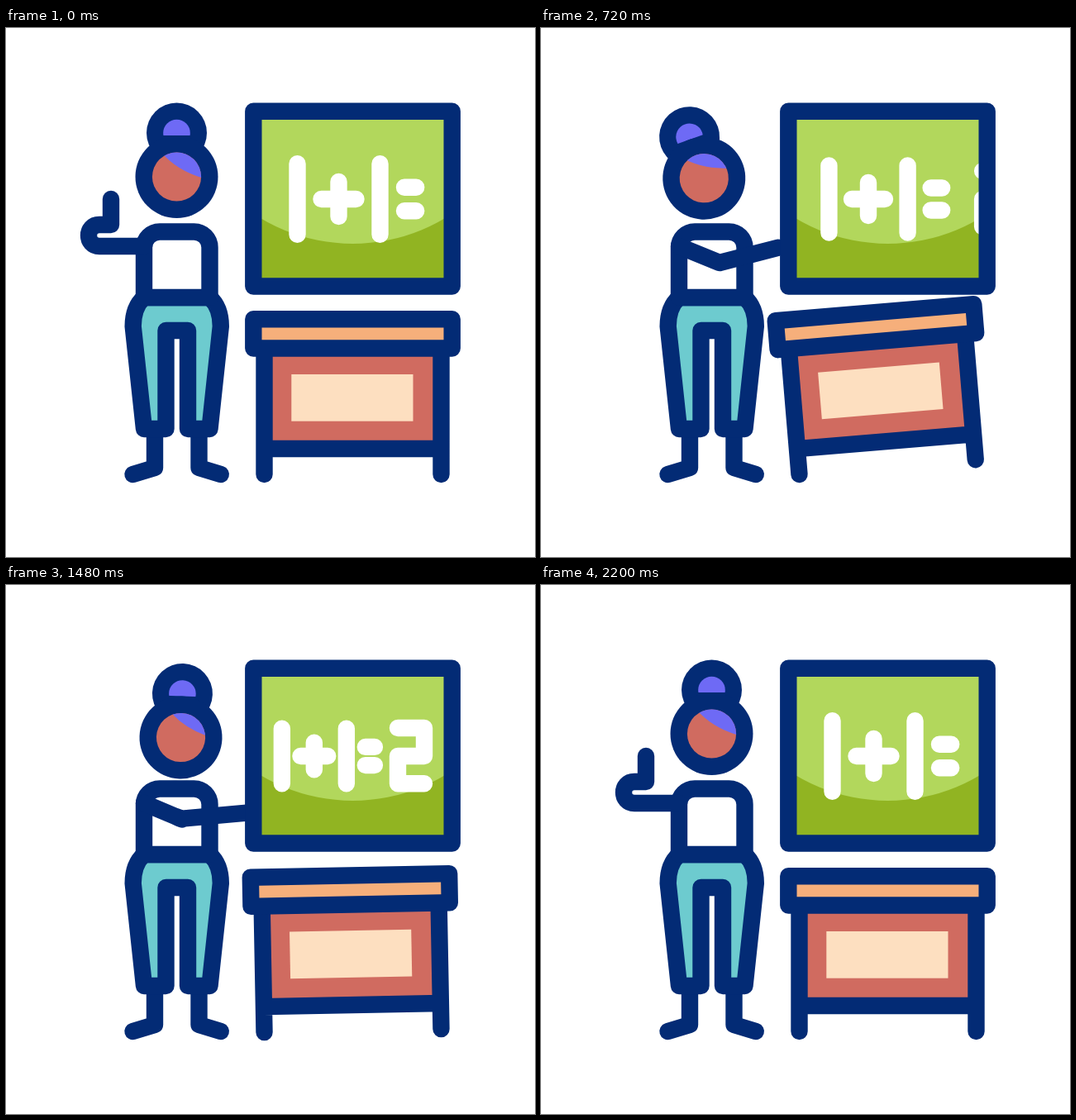
Write an HTML page with a canvas that moves like this. It is 640 px wide and 640 px high and loops after 2400 ms.

```html
<!DOCTYPE html>
<html lang="en">
<head>
<meta charset="utf-8">
<title>Teacher at the board</title>
<style>
html, body { margin: 0; width: 100%; height: 100%; overflow: hidden; background: #fff; }
canvas { display: block; width: 640px; height: 640px; }
</style>
</head>
<body>
<canvas id="stage" width="640" height="640"></canvas>
<script>
const ctx = document.getElementById('stage').getContext('2d');
const LOOP = 2400;
const STROKE = 20.4;
const NAVY = '#032b75', LIME = '#b2d75c', MOSS = '#91b422', VIOLET = '#6e6af5',
      BRICK = '#d06b60', TEAL = '#6dcbcf', ORANGE = '#f6af7b', CREAM = '#fddfc0';

const lerp = (a, b, k) => a + (b - a) * k;
const mix = (a, b, k) => [lerp(a[0], b[0], k), lerp(a[1], b[1], k)];
const ease = k => k * k * (3 - 2 * k);

// Eased value at time t from [time, value] keys.
function track(t, ...keys) {
  if (t <= keys[0][0]) return keys[0][1];
  for (let i = 1; i < keys.length; i++) {
    const [t0, v0] = keys[i - 1], [t1, v1] = keys[i];
    if (t < t1) return lerp(v0, v1, ease((t - t0) / (t1 - t0)));
  }
  return keys[keys.length - 1][1];
}

function outline(path, fill, color = NAVY) {
  if (fill) { ctx.fillStyle = fill; ctx.fill(path); }
  ctx.strokeStyle = color;
  ctx.stroke(path);
}

function box(x, y, w, h, fill) {
  const p = new Path2D();
  p.rect(x, y, w, h);
  outline(p, fill);
}

function disc(x, y, r, fill) {
  ctx.fillStyle = fill;
  ctx.beginPath();
  ctx.arc(x, y, r, 0, Math.PI * 2);
  ctx.fill();
}

function rotateAbout(x, y, degrees) {
  ctx.translate(x, y);
  ctx.rotate(degrees * Math.PI / 180);
  ctx.translate(-x, -y);
}

const torso = new Path2D('M167 326V265.5A19 19 0 0 1 186 246.5H227.5A19 19 0 0 1 246.5 265.5V326Z');
const trousers = new Path2D('M167 326C158 334 153.7 347 153.7 361L167 485H193.5V366H220V485H246.5L259.8 361C259.8 347 255.5 334 246.5 326Z');
const feet = new Path2D('M180 490V532L153.5 540M233.5 490V532L259.8 540');
const two = new Path2D('M474 173H506V207H474V240.3H506');
const deskLegs = new Path2D('M312.5 388V540M526.5 388V540M312.5 509H526.5');

function drawBody() {
  outline(feet);
  outline(trousers, TEAL);
  outline(torso, '#fff');
}

function drawArm(t) {
  const bend = track(t, [200, 0], [600, 1], [1400, 1], [2200, 0]);
  const reach = track(t, [600, 0], [1000, 1], [1400, 1], [1800, 0]);
  const elbow = [216, 284], inner = [206, 280];
  const hand = mix([127, 207], [282 + 20 * reach, 262 + 17.5 * reach], bend ** 1.15);
  const wrist = mix([127, 238], elbow, bend);
  const top = mix([113, 238], elbow, bend);
  const bottom = mix([113, 264], elbow, bend);
  ctx.beginPath();
  ctx.moveTo(...hand);
  ctx.lineTo(...wrist);
  ctx.lineTo(...top);
  ctx.bezierCurveTo(...mix([95.7, 238], inner, bend), ...mix([95.7, 264], inner, bend), ...bottom);
  ctx.lineTo(167, 264);
  ctx.strokeStyle = NAVY;
  ctx.stroke();
}

function drawHead(t) {
  const tilt = track(t, [200, 0], [500, -20], [670, -20], [1230, 2.3], [1400, 2.3], [1800, 0]);
  const nod = track(t, [670, 0], [1230, 1], [1400, 1], [1800, 0]);
  const part = track(t, [200, 0], [700, 3.2], [1230, 5], [1400, 5], [1800, 0]);
  ctx.save();
  ctx.translate(4.5 * nod, 5 * nod);
  rotateAbout(206.5, 208, tilt);

  disc(206.5, 127, 36.5, NAVY);
  ctx.save();
  ctx.beginPath();
  ctx.rect(186, 105, 41, 25);
  ctx.clip();
  disc(206.5, 127, 16.3, VIOLET);
  ctx.restore();

  disc(206.5, 180, 50, NAVY);
  disc(206.5, 180, 29.6, BRICK);
  ctx.beginPath();
  ctx.arc(206.5, 180, 29.6, 0, Math.PI * 2);
  ctx.clip();
  ctx.translate(0.5 * part, -0.86 * part);
  ctx.beginPath();
  ctx.moveTo(184, 146);
  ctx.quadraticCurveTo(206, 174, 244, 183);
  ctx.lineTo(260, 140);
  ctx.lineTo(200, 130);
  ctx.fillStyle = VIOLET;
  ctx.fill();
  ctx.restore();
}

function drawSum(t) {
  const shrink = track(t, [600, 0], [1000, 1], [1800, 1], [2200, 0]);
  const size = 1 - 0.22 * shrink;
  const px = x => 424.5 - 34.5 * shrink + (x - 424.5) * size;
  const py = y => 207 + (y - 207) * size;
  const line = (x0, y0, x1, y1) => {
    ctx.moveTo(px(x0), py(y0));
    ctx.lineTo(px(x1), py(y1));
  };
  ctx.strokeStyle = '#fff';
  ctx.beginPath();
  line(352.5, 164.3, 352.5, 249.7);
  line(381.5, 207, 423.5, 207);
  line(402.5, 186, 402.5, 228);
  line(452.5, 164.3, 452.5, 249.7);
  line(482, 192.8, 496.2, 192.8);
  line(482, 221.2, 496.2, 221.2);
  ctx.stroke();
  ctx.translate(77 * (1 - shrink), 0);
  outline(two, null, '#fff');
}

function drawBoard(t) {
  ctx.save();
  ctx.beginPath();
  ctx.rect(299, 100.5, 241, 212);
  ctx.clip();
  ctx.fillStyle = MOSS;
  ctx.fillRect(299, 100, 241, 213);
  disc(419.5, 44.3, 216.7, LIME);
  drawSum(t);
  ctx.restore();
  box(299.3, 100.7, 240.4, 211.8);
}

function drawDesk(t) {
  const tilt = track(t, [240, 0], [640, -5], [1190, -1.2], [1400, -1.2], [1800, 0]);
  const sink = track(t, [640, 0], [1190, 1.2], [1400, 1.2], [1800, 0]);
  ctx.save();
  ctx.translate(0, sink);
  rotateAbout(312.5, 540, tilt);
  ctx.fillStyle = BRICK;
  ctx.fillRect(312.5, 388, 214, 121);
  ctx.fillStyle = CREAM;
  ctx.fillRect(345.3, 419, 147.2, 56.7);
  outline(deskLegs);
  box(299.3, 352.3, 240.4, 35.2, ORANGE);
  ctx.restore();
}

function draw(now) {
  const t = now % LOOP;
  ctx.fillStyle = '#fff';
  ctx.fillRect(0, 0, 640, 640);
  ctx.lineWidth = STROKE;
  ctx.lineCap = ctx.lineJoin = 'round';
  drawBody();
  drawArm(t);
  drawHead(t);
  drawBoard(t);
  drawDesk(t);
}

const start = performance.now();
function tick() {
  draw(performance.now() - start);
  requestAnimationFrame(tick);
}
tick();
</script>
</body>
</html>
```
